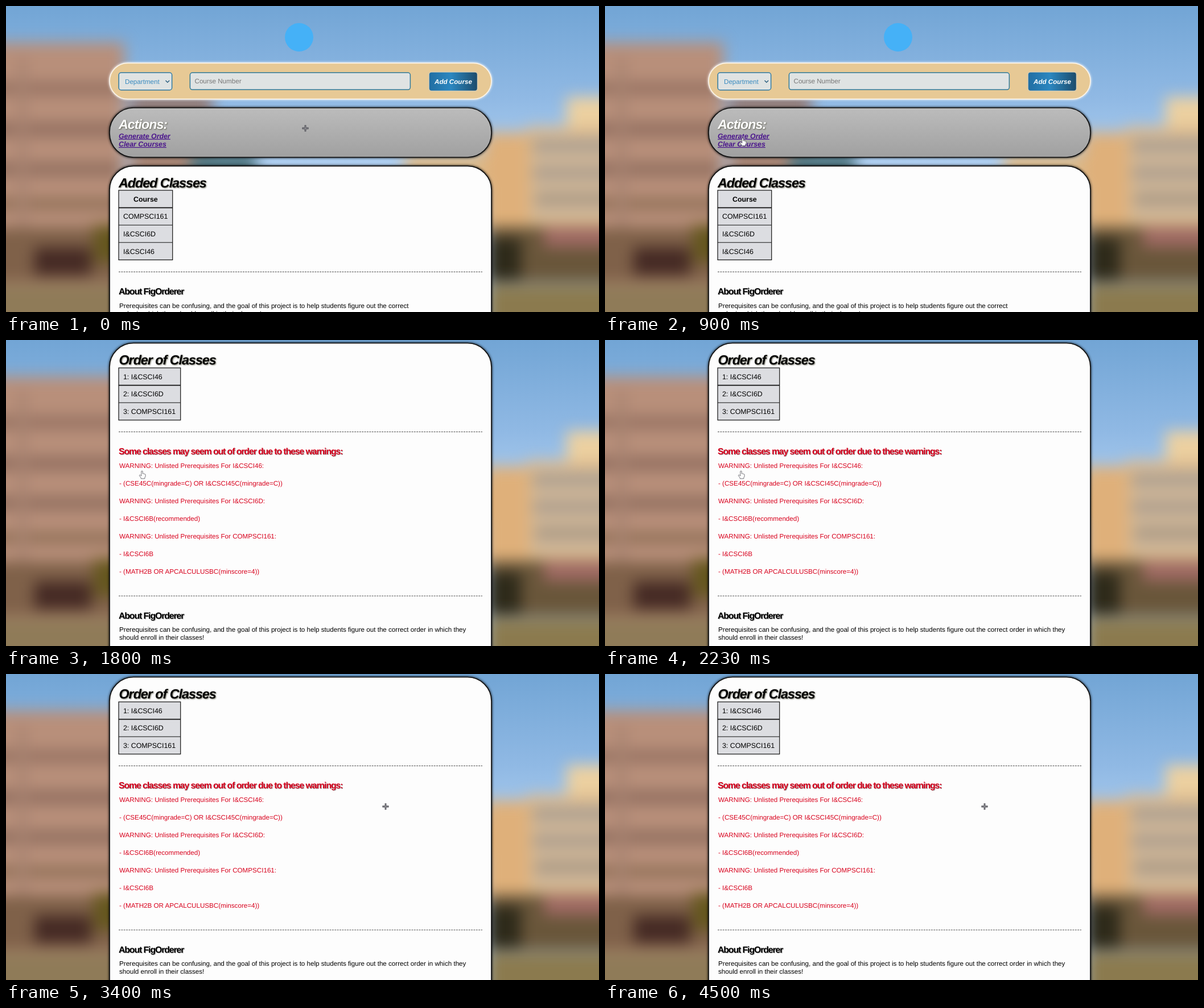
These frames come from a looping animation (1042x538 px, 4.53 s). An HTML page:

```html
<!DOCTYPE html>
<html lang="en">
<head>
<meta charset="utf-8">
<title>Course planner</title>
<style>
html, body { margin: 0; width: 100%; height: 100%; overflow: hidden; }
svg { display: block; width: 1042px; height: 538px; }
text { font-family: "Liberation Sans", Arial, sans-serif; font-size: 11.64px; text-rendering: geometricPrecision; }
.h1 { font-size: 23.28px; font-weight: bold; font-style: italic; letter-spacing: -1px; filter: drop-shadow(1px 1px 1px rgba(70,70,50,.75)); }
.h3 { font-size: 15.7px; font-weight: bold; letter-spacing: -1.02px; filter: drop-shadow(1px 1px .6px rgba(90,90,90,.55)); }
.cell { font-size: 12.36px; }
.link { font-size: 12.36px; font-weight: bold; font-style: italic; fill: #4a148c; text-decoration: underline; }
.btn { font-weight: bold; font-style: italic; fill: #fff; }
.red { fill: #d8001c; }
</style>
</head>
<body>
<svg viewBox="0 0 1042 538">
  <defs>
    <linearGradient id="sky" x2="0" y2="1">
      <stop offset="0" stop-color="#72a5d5"/>
      <stop offset=".3" stop-color="#90b9e4"/>
      <stop offset=".52" stop-color="#afcff0"/>
    </linearGradient>
    <linearGradient id="grey" x2="0" y2="1">
      <stop offset="0" stop-color="#bcbcbc"/>
      <stop offset="1" stop-color="#a0a0a0"/>
    </linearGradient>
    <linearGradient id="blue">
      <stop offset="0" stop-color="#216ea3"/>
      <stop offset=".45" stop-color="#2c87c0"/>
      <stop offset="1" stop-color="#1c4c6c"/>
    </linearGradient>
    <filter id="soft" filterUnits="userSpaceOnUse" x="-80" y="-80" width="1202" height="698" color-interpolation-filters="sRGB">
      <feGaussianBlur stdDeviation="13"/>
    </filter>
  </defs>
  <rect width="1042" height="538" fill="url(#sky)"/>
  <g id="photo" filter="url(#soft)"></g>
  <g id="planner"></g>
  <g id="result"></g>
  <circle id="ring" cx="238" cy="229" fill="none" stroke="#cf3b52" stroke-width="2.2"/>
  <g id="cross" fill="none">
    <path d="M-5.5 0H5.5M0 -5.5V5.5" stroke="#3e3e46" stroke-width="2.8"/>
    <path d="M-4.6 0H4.6M0 -4.6V4.6" stroke="#c4c4c8" stroke-width=".8"/>
  </g>
  <path id="hand" fill="#fff" stroke="#55555c" stroke-width=".8" stroke-linejoin="round"
    d="M-1.2 .8Q0 -.6 1.2 .8V5L2.4 4.8L3.2 5.4L4.3 5.2L5.1 6L6 6.2V10L4.8 12V13.8H-1.8V12.3L-4.6 8.6Q-4.9 7 -3.4 7.2L-1.2 9Z"/>
</svg>
<script>
const $ = id => document.getElementById(id);
const INK = '#111', CELL = '#dcdde1', LOOP = 4530, CLICK = 1380, SWITCH = 1700;

const rect = (x, y, w, h, fill, more = '') =>
  `<rect x="${x}" y="${y}" width="${w}" height="${h}" fill="${fill}" ${more}/>`;
const text = (x, y, s, cls = '', more = '') =>
  `<text x="${x}" y="${y}" class="${cls}" ${more}>${s.replace(/&/g, '&amp;')}</text>`;
const line = (x1, y1, x2, y2, more = '') =>
  `<path d="M${x1} ${y1}L${x2} ${y2}" stroke="${INK}" ${more}/>`;
const dashes = y => line(198, y, 837, y, 'stroke-dasharray="2.9 1.46" opacity=".75"');
const panel = (y, h, r, fill, edge, glow) =>
  rect(182, y, 671, h, fill, `rx="${r}" stroke="${edge}" stroke-width="1.7" style="filter:drop-shadow(0 0 2px ${glow})"`);

function table(y, w, rows, header) {
  const step = 30.6;
  let out = rect(198, y, w, step * rows.length, CELL, `stroke="${INK}" stroke-width="1.2"`);
  rows.forEach((s, i) => {
    const top = y + i * step;
    if (i) out += line(198, top, 198 + w, top, `stroke-width="${i === 1 ? 1.7 : 1}"`);
    out += header && !i
      ? text(198 + w / 2, top + 19.8, s, 'cell', 'font-weight="bold" text-anchor="middle"')
      : text(206, top + 19.8, s, 'cell');
  });
  return out;
}

const about = (y, lines) => text(198, y, 'About FigOrderer', 'h3') +
  lines.map((s, i) => text(199, y + 23.7 + i * 13.8, s)).join('');

// Blurred campus view: x, y, width, height, colour
$('photo').innerHTML = [
  [-60, 64, 268, 600, '#b88f7a'], [218, 150, 145, 135, '#937e7b'],
  [-60, 134, 262, 22, '#967262'], [-60, 205, 262, 24, '#926f60'],
  [-60, 275, 262, 24, '#927060'], [-60, 338, 262, 20, '#907057'],
  [22, 90, 14, 300, '#a78371'],
  [-60, 390, 262, 95, '#7f6149'], [50, 425, 100, 48, '#452a24'],
  [154, 385, 60, 65, '#65571e'], [-60, 490, 300, 130, '#8f7b58'],
  [218, 255, 105, 60, '#a58372'], [325, 255, 115, 60, '#4f7580'],
  [700, 258, 160, 60, '#d9b98c'],
  [985, 160, 140, 70, '#ecd0a0'], [915, 212, 200, 190, '#dcb98c'],
  [840, 222, 78, 170, '#dfb07a'], [925, 225, 180, 150, '#cdb597'],
  [925, 238, 180, 15, '#a1978d'], [925, 286, 180, 15, '#a3968a'],
  [930, 332, 180, 15, '#a0917f'],
  [845, 388, 270, 98, '#69563a'], [945, 390, 160, 34, '#a06a64'],
  [845, 408, 60, 74, '#2e2a1a'], [845, 490, 270, 130, '#8b7a4e']
].map(a => rect(...a)).join('');

$('planner').innerHTML =
  '<circle cx="515" cy="55" r="25" fill="#45b1f7"/>' +
  panel(100.3, 63.4, 31.7, '#e7c995', '#fbf4e8', '#fff') +
  rect(198.2, 117.3, 93.4, 30.4, '#dfe3e3', 'rx="4" stroke="#2f7ba6" stroke-width="1.5"') +
  text(209, 136.5, 'Department', '', 'fill="#3a8bc0"') +
  '<path d="M280.5 131l3.3 3.3l3.3 -3.3" fill="none" stroke="#2b5f80" stroke-width="1.5"/>' +
  rect(323.4, 117.3, 387, 29.8, '#dfe3e3', 'rx="4" stroke="#2f7b9c" stroke-width="1.5"') +
  text(331.5, 136.3, 'Course Number', '', 'fill="#777"') +
  rect(743.8, 116.8, 84, 32, 'url(#blue)', 'rx="4" style="filter:drop-shadow(0 0 1.5px #bcd4e8)"') +
  text(753, 136.5, 'Add Course', 'btn') +
  panel(179, 87, 42, 'url(#grey)', INK, '#000') +
  text(198, 216, 'Actions:', 'h1', 'fill="#fff"') +
  text(198, 232.7, 'Generate Order', 'link') +
  text(198, 247, 'Clear Courses', 'link') +
  panel(281.3, 400, 42, '#fdfdfd', INK, '#000') +
  text(198, 318.6, 'Added Classes', 'h1') +
  table(324, 94.7, ['Course', 'COMPSCI161', 'I&CSCI6D', 'I&CSCI46'], true) +
  dashes(467.5) +
  about(507.3, [
    'Prerequisites can be confusing, and the goal of this project is to help students figure out the correct',
    'order in which they should enroll in their classes!'
  ]);

$('result').innerHTML =
  panel(5.5, 700, 42, '#fdfdfd', INK, '#000') +
  text(198.5, 43, 'Order of Classes', 'h1') +
  table(49, 108.7, ['1: I&CSCI46', '2: I&CSCI6D', '3: COMPSCI161']) +
  dashes(161.5) +
  text(198, 201.4, 'Some classes may seem out of order due to these warnings:', 'h3 red') +
  [
    'WARNING: Unlisted Prerequisites For I&CSCI46:',
    '- (CSE45C(mingrade=C) OR I&CSCI45C(mingrade=C))',
    'WARNING: Unlisted Prerequisites For I&CSCI6D:',
    '- I&CSCI6B(recommended)',
    'WARNING: Unlisted Prerequisites For COMPSCI161:',
    '- I&CSCI6B',
    '- (MATH2B OR APCALCULUSBC(minscore=4))'
  ].map((s, i) => text(199, 224.7 + i * 31.05, s, 'red')).join('') +
  dashes(450) +
  about(489.7, [
    'Prerequisites can be confusing, and the goal of this project is to help students figure out the correct order in which they',
    'should enroll in their classes!'
  ]);

// Pointer moves: start, end, from, to, sag of the arc
const moves = [
  { start: 100, end: 780, from: [526, 215], to: [242, 232], sag: 0 },
  { start: 900, end: 1300, from: [242, 232], to: [239, 230], sag: 0 },
  { start: 2400, end: 3250, from: [239, 230], to: [667, 233], sag: 37 }
];
const clamp = u => Math.min(1, Math.max(0, u));
const ease = u => u * u * (3 - 2 * u);

function pointer(t) {
  const { start, end, from, to, sag } = moves.findLast(m => t >= m.start) || moves[0];
  const u = ease(clamp((t - start) / (end - start)));
  return [
    from[0] + (to[0] - from[0]) * u,
    from[1] + (to[1] - from[1]) * u + sag * Math.sin(Math.PI * u)
  ];
}

const show = (id, on) => $(id).style.display = on ? '' : 'none';

function draw(now) {
  const t = now % LOOP, [x, y] = pointer(t);
  const onLink = t < SWITCH && x < 289 && y > 221 && y < 250;
  const isHand = onLink || (t >= SWITCH && t <= moves[2].start);
  show('planner', t < SWITCH);
  show('result', t >= SWITCH);
  show('hand', isHand);
  show('cross', !isHand);
  $(isHand ? 'hand' : 'cross').setAttribute('transform', `translate(${x} ${y})`);
  $('ring').setAttribute('r', 10 + 16.5 * clamp((t - CLICK) / 90));
  $('ring').setAttribute('opacity', t < CLICK ? 0 : .8 * clamp((1600 - t) / 110));
  requestAnimationFrame(draw);
}
requestAnimationFrame(() => draw(performance.now()));
</script>
</body>
</html>
```
